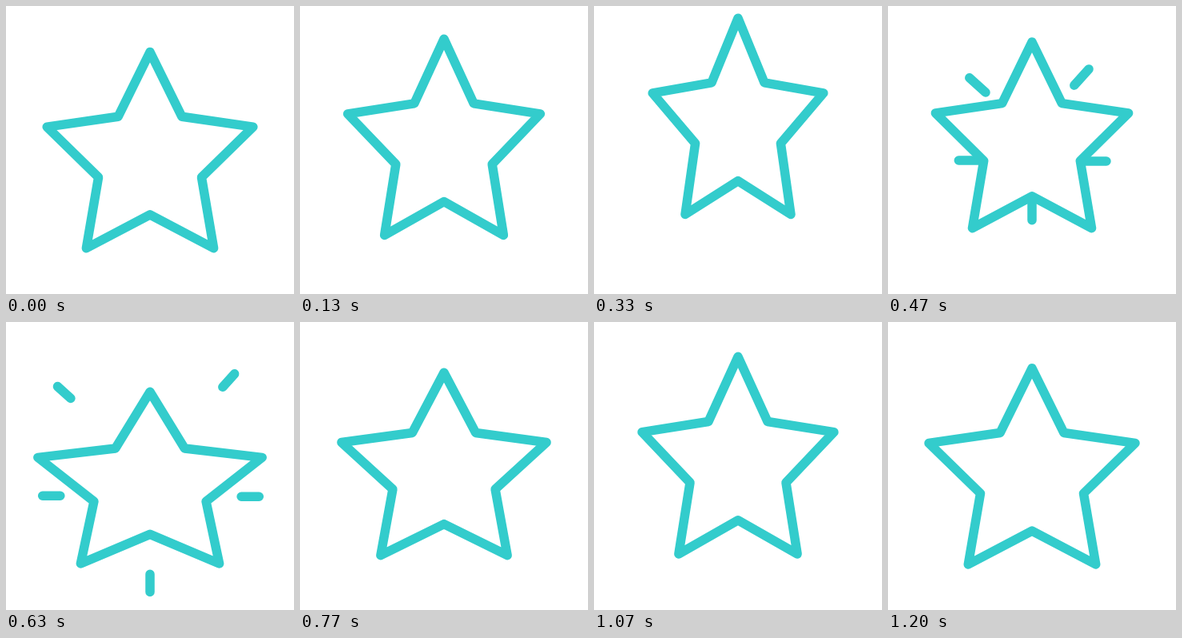
Write an HTML page that moves like this. It is 360 by 360 pixels and loops after 1.57 s.

```html
<!DOCTYPE html>
<html lang="en">
<head>
<meta charset="utf-8">
<title>Jumping star</title>
<style>
  html, body { margin: 0; width: 100%; height: 100%; overflow: hidden; background: #fff; }
  svg { display: block; width: 100%; height: 100%; }
  path { fill: #fff; stroke: #33cccc; stroke-width: 11.5; stroke-linecap: round; stroke-linejoin: round; }
</style>
</head>
<body>
<svg viewBox="0 0 360 360">
  <path id="sparks"/>
  <path id="star"/>
</svg>
<script>
const LOOP = 1570, FPS = 30, LAST_TICK = 36;
const CENTER_X = 180, FLOOR = 303, RADIUS = 135.6;
const FOOT = RADIUS * Math.cos(Math.PI / 5); // star centre to its feet

// Rest, leap, squash, small bounce, rest
const poses = [
  { tick: -0.5, width: 1, height: 1, lift: 0 },
  { tick: 10, width: 0.828, height: 1, lift: 42.5 },
  { tick: 19, width: 1.087, height: 0.875, lift: 1 },
  { tick: 28, width: 0.86, height: 1.011, lift: 26 },
  { tick: 36, width: 1, height: 1, lift: 0 }
];

// Direction in degrees and final tip, seen from the star centre
const sparks = [
  [0, 138, 26],
  [90, 0, 147],
  [180, -136, 25],
  [222, -117, -113],
  [312, 107, -129]
];

const mix = (a, b, p) => a + (b - a) * p;
const progress = (t, from, to) => Math.min(1, Math.max(0, (t - from) / (to - from)));
const ease = p => (1 - Math.cos(Math.PI * p)) / 2;

function poseAt(tick) {
  const next = poses.findIndex(pose => tick <= pose.tick);
  const a = poses[next - 1], b = poses[next];
  const p = ease(progress(tick, a.tick, b.tick));
  const at = key => mix(a[key], b[key], p);
  return { width: at("width"), height: at("height"), base: FLOOR - at("lift") };
}

function starPath({ width, height, base }) {
  const points = Array.from({ length: 10 }, (_, i) => {
    const angle = i * Math.PI / 5, r = i % 2 ? RADIUS / 2 : RADIUS;
    return [CENTER_X + r * Math.sin(angle) * width, base - (FOOT + r * Math.cos(angle)) * height];
  });
  return `M${points.join("L")}Z`;
}

function sparksPath(tick, base) {
  const burst = ease(progress(tick, 10, 20));
  const length = mix(30, 22, burst) * (1 - progress(tick, 19, 23));
  if (!burst || !length) return "";
  return sparks.map(([degrees, x, y]) => {
    const angle = degrees * Math.PI / 180;
    const back = Math.hypot(x, y) * 0.49 * (1 - burst);
    const point = d => [CENTER_X + x - d * Math.cos(angle), base - FOOT + y - d * Math.sin(angle)];
    return `M${point(back)}L${point(back + length)}`;
  }).join("");
}

function draw(time) {
  const tick = Math.min(LAST_TICK, Math.floor((time % LOOP + 4) * FPS / 1000));
  const pose = poseAt(tick);
  document.getElementById("star").setAttribute("d", starPath(pose));
  document.getElementById("sparks").setAttribute("d", sparksPath(tick, pose.base));
}

const start = performance.now();
(function loop() {
  draw(performance.now() - start);
  requestAnimationFrame(loop);
})();
</script>
</body>
</html>
```
